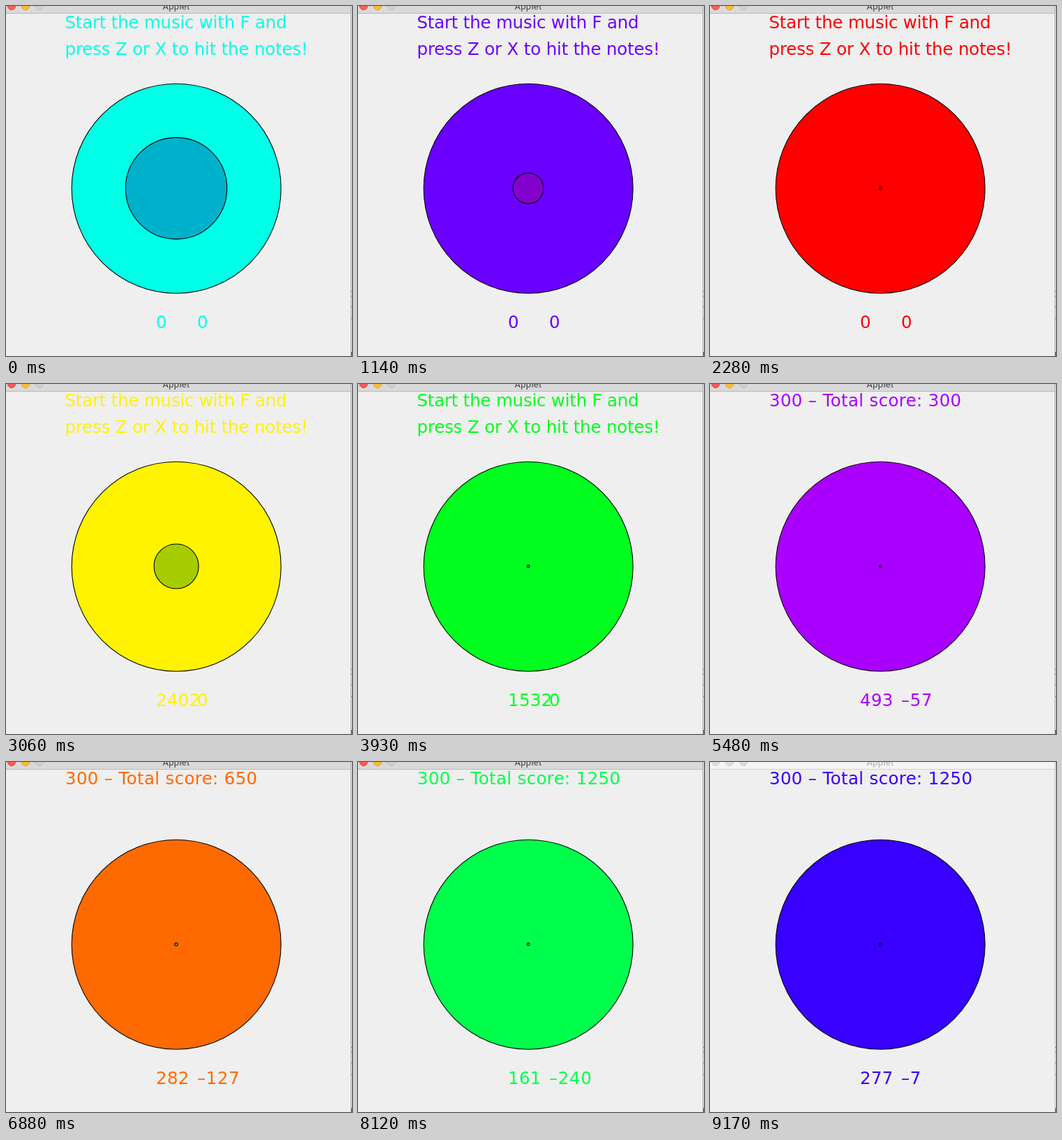
Recreate the animation shown at these times as an HTML page with a canvas. Size 496 by 501 pixels, loop 9.27 s.

```html
<!DOCTYPE html>
<html>
<head>
<meta charset="utf-8">
<style>
html, body { margin: 0; width: 100%; height: 100%; overflow: hidden; background: #efefef; }
canvas { display: block; }
</style>
</head>
<body>
<canvas id="stage" width="496" height="501"></canvas>
<script>
const ctx = document.getElementById('stage').getContext('2d');
const LOOP = 9270, STEP = 62, INACTIVE = 9170, MUSIC = 2400;
const FONT = '"DejaVu Sans", sans-serif';

// [time, hue]; the hue keeps turning
const hues = [[0, 174], [2280, 360], [3930, 487], [5480, 640], [6880, 745], [8120, 858], [9170, 973]];
// [start, end, largest radius] of each growing inner disc
const pulses = [[-1100, 425, 150], [425, 2280, 150], [2280, 3930, 150], [3930, 5480, 150],
  [5480, 6770, 169], [6770, 8120, 150], [8120, 9170, 150], [9170, 10500, 150]];
const notes = [5462, 5973, 6580, 7162, 7722, 8281, 8864, 9447];
// [time, points, total, offset]
const hits = [[5480, 300, 300, '–57'], [6100, 50, 350, '–110'], [6707, 300, 650, '–127'],
  [7290, 300, 950, '–128'], [7962, 300, 1250, '–240'], [8871, 300, 1250, '–7']];

function hueAt(t) {
  let i = hues.length - 1;
  while (hues[i][0] > t) i--;
  const [t0, h0] = hues[i];
  if (i === hues.length - 1) return h0;
  const [t1, h1] = hues[i + 1];
  const held = t0 + Math.floor((t - t0) / STEP) * STEP;
  return h0 + (h1 - h0) * (held - t0) / (t1 - t0);
}

function radiusAt(t) {
  const [a, b, max] = pulses.find(p => t < p[1]);
  const held = a + Math.floor((t - a) / STEP) * STEP;
  return 1.9 + (max - 1.9) * ((held - a) / (b - a)) ** 2;
}

function disc(x, y, r, fill, stroke) {
  ctx.beginPath();
  ctx.arc(x, y, r, 0, 2 * Math.PI);
  ctx.fillStyle = fill;
  ctx.fill();
  if (stroke) {
    ctx.strokeStyle = stroke;
    ctx.stroke();
  }
}

function rect(x, y, w, h, fill) {
  ctx.fillStyle = fill;
  ctx.fillRect(x, y, w, h);
}

function write(s, x, y, spacing) {
  ctx.letterSpacing = spacing + 'px';
  ctx.fillText(s, x, y);
}

function drawWindow(active) {
  rect(0, 0, 496, 501, '#efefef');
  rect(0, 0, 495, 10, active ? '#d9d9d9' : '#f4f4f4');
  rect(0, 10, 495, 1, active ? '#b8b8b8' : '#d2d2d2');
  const lights = active ? ['#fc5b55', '#fdbd30', '#d0d0d0'] : ['#dcdcdc', '#dcdcdc', '#dcdcdc'];
  const rims = active ? ['#e2463f', '#dfa023', '#bcbcbc'] : ['#cfcfcf', '#cfcfcf', '#cfcfcf'];
  lights.forEach((c, i) => disc(8 + 20 * i, 0, 5.5, c, rims[i]));
  ctx.font = '13px Roboto, sans-serif';
  ctx.textAlign = 'center';
  ctx.fillStyle = active ? '#444' : '#b0b0b0';
  write('Applet', 244, 5, 0.3);
  ctx.textAlign = 'left';
  rect(494, 0, 1, 501, active ? '#a8a8a8' : '#c4c4c4');
  rect(495, 0, 1, 501, '#e6e6e6');
  for (const y of [408, 415, 430, 447]) rect(495, y, 1, 1, '#777');
  rect(495, 495, 1, 6, '#555');
}

function draw(t) {
  const hue = hueAt(t) % 360;
  const color = `hsl(${hue}, 100%, 50%)`;
  const hit = hits.filter(h => h[0] <= t).pop();
  const next = notes.find(n => n > t);

  ctx.lineWidth = 1;
  drawWindow(t < INACTIVE);
  ctx.lineWidth = 1.1;
  disc(244.2, 261.2, 150, color, '#000');
  disc(244.1, 261, radiusAt(t), `hsl(${hue + 14}, 100%, 40%)`, '#000');

  ctx.font = '24.5px ' + FONT;
  ctx.fillStyle = color;
  if (hit) {
    write(`${hit[1]} – Total score: ${hit[2]}`, 85, 32, 0.33);
  } else {
    write('Start the music with F and', 84.5, 32, -0.22);
    write('press Z or X to hit the notes!', 84.5, 70, -0.17);
  }
  write(t < MUSIC ? '0' : String(Math.ceil(next - t) + 1), 215, 461, 0.3);
  write(hit ? hit[3] : '0', 274, 461, 0.6);
}

function tick() {
  draw(performance.now() % LOOP);
  requestAnimationFrame(tick);
}
tick();
</script>
</body>
</html>
```
